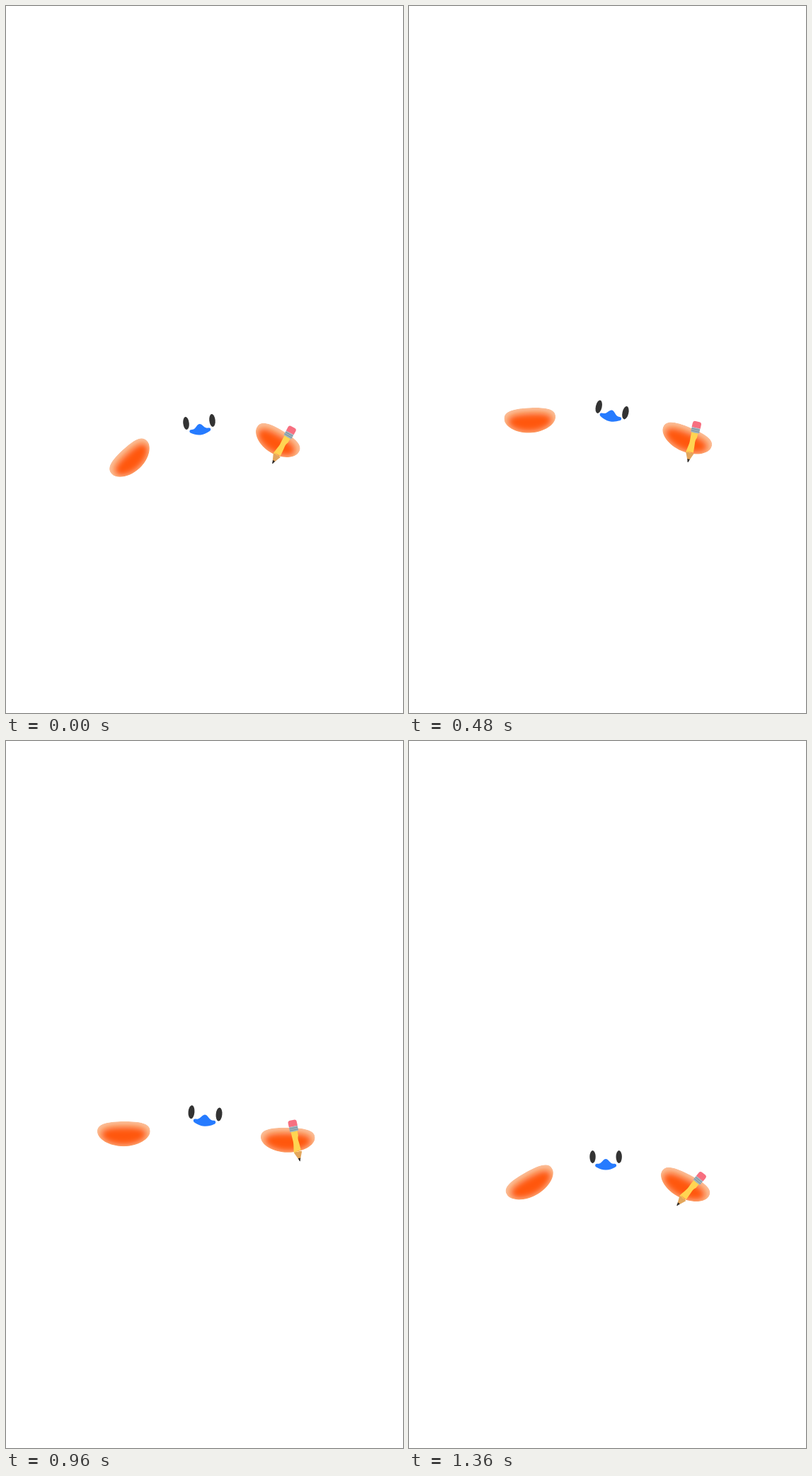
Recreate the animation shown at these times as an HTML page. Size 561x998 px, loop 1.56 s.

```html
<!DOCTYPE html>
<html lang="en">
<head>
<meta charset="utf-8">
<title>Waving bird</title>
<style>
html, body { margin: 0; width: 100%; height: 100%; overflow: hidden; background: #fff; }
svg { display: block; width: 561px; height: 998px; }
</style>
</head>
<body>
<svg viewBox="0 0 561 998" xmlns="http://www.w3.org/2000/svg">
  <defs>
    <path id="wing" d="M-37-3.6C-37-13.5-26.6-17.6 0-17.6S37-13.5 37-3.6C37 7 20.4 17.6 0 17.6S-37 7-37-3.6Z"/>
    <clipPath id="wingClip"><use href="#wing"/></clipPath>
    <filter id="soft" x="-50%" y="-80%" width="200%" height="260%">
      <feGaussianBlur stdDeviation="4.8"/>
    </filter>
    <g id="arm" clip-path="url(#wingClip)">
      <use href="#wing" fill="#fbc19c"/>
      <g filter="url(#soft)">
        <use href="#wing" fill="#ff560c" transform="translate(0 3.2) scale(.86 .73)"/>
      </g>
    </g>
  </defs>
  <use id="left" href="#arm"/>
  <use id="right" href="#arm"/>
  <g id="pencil">
    <path d="M-4.6 14.5H4.6C4.6 10 4.2 5.5 3.7 0C3.5-4 4.8-6 5.1-7V-14H-4.1V-7C-4.1-4-3.4 0-4 4C-4.6 9-5.8 13-5.8 16.5L0 19 5.6 16.5Z" fill="#ffd452"/>
    <path d="M-5.8 16.3Q-3 14.6 0 16.3Q3 14.6 5.6 16.3L1.6 26H-1.6Z" fill="#e3a65c"/>
    <path d="M-1.8 25H1.8L.5 29.3Q0 29.8-.5 29.3Z" fill="#2b2724"/>
    <g transform="translate(.7 0)">
      <path d="M-6-13.5V-20.5H6V-13.5Q0-12.8-6-13.5Z" fill="#9eb4bf"/>
      <path d="M-6-18.2H6M-6-15.6H6" stroke="#748b98" stroke-width=".8"/>
      <path d="M-6.2-20.5V-26Q-6.2-29.5-2.7-29.5H2.7Q6.2-29.5 6.2-26V-20.5Z" fill="#f76f80"/>
    </g>
  </g>
  <g id="head">
    <g fill="#333">
      <ellipse cx="-18.6" rx="4.2" ry="9"/>
      <ellipse cx="18.6" rx="4.2" ry="9"/>
    </g>
    <path id="beak" fill="#267bff" d="M-14.8 11C-14 9.5-12 10-10 9.8C-5.5 9-4 3.2 0 3C4 3.2 5.5 9 10 9.8C12 10 14 9.5 14.8 11C15.3 12.5 14.8 14 13 14.8C9 17 5 18.5 0 18.5S-9 17-13 14.8C-14.8 14-15.3 12.5-14.8 11Z"/>
  </g>
</svg>
<script>
const LOOP = 1560, STEP = 40, REST = 1360;

const el = id => document.getElementById(id);

// Sine ease from 0 to 1 between two times
function ease(t, from, to) {
  const u = Math.min(1, Math.max(0, (t - from) / (to - from)));
  return (1 - Math.cos(Math.PI * u)) / 2;
}

function place(id, x, y, turn, sx = 1, sy = 1) {
  el(id).setAttribute("transform",
    `translate(${x} ${y}) rotate(${turn}) scale(${sx} ${sy})`);
}

function placeArm(id, x, y, turn, half) {
  place(id, x, y, turn, half / 37);
}

function draw(now) {
  const t = Math.min(REST, Math.floor(now % LOOP / STEP) * STEP);

  const swing = ease(t, 0, 320);      // lean over, arms out
  const back = ease(t, 440, 1340);    // head straightens
  const fall = ease(t, 850, 1340);
  const lift = ease(t, 280, 850) - fall;
  const level = ease(t, 320, 940);    // right arm turns flat
  const flap = ease(t, 960, 1220);    // arms fold down, then open a little
  const settle = ease(t, 1200, 1360);
  const fold = flap - settle;

  const tilt = -6.2 + 19 * swing - 12.8 * back;
  const size = 1 + 0.03 * (swing + lift - fall);
  place("head", 273 + 14.1 * swing - 9 * back,
    587 + 3 * (swing - fall) - 73 * lift, tilt, size, size);
  place("beak", 0, -0.2 * Math.max(0, tilt), 0);

  placeArm("left", 176.7 - 3.7 * swing - 7.5 * lift - settle,
    639.7 - 39.7 * swing - 55 * lift + 25 * fall,
    -43 + 39 * swing + 4 * lift - 34 * flap + 8.5 * settle,
    34.3 + 1.7 * swing + 1.5 * lift + fall);

  placeArm("right", 382.5 + 6.5 * swing + 10.5 * lift - 3 * fold,
    615 + 18.5 * swing - 79 * lift - 5.5 * fall + 5 * fold,
    31 - 4 * swing - 26 * level + 37 * flap - 10.5 * settle,
    34.6 + 1.9 * swing + 2 * lift + 1.3 * fall);

  place("pencil", 390.7 + 5.8 * swing + 14.5 * lift + 0.7 * fall,
    620 + 18 * swing - 83 * lift - 5 * fall,
    28.8 - 4.4 * swing - 43 * lift + 14.8 * fall);
}

function tick() {
  draw(performance.now());
  requestAnimationFrame(tick);
}
tick();
</script>
</body>
</html>
```
